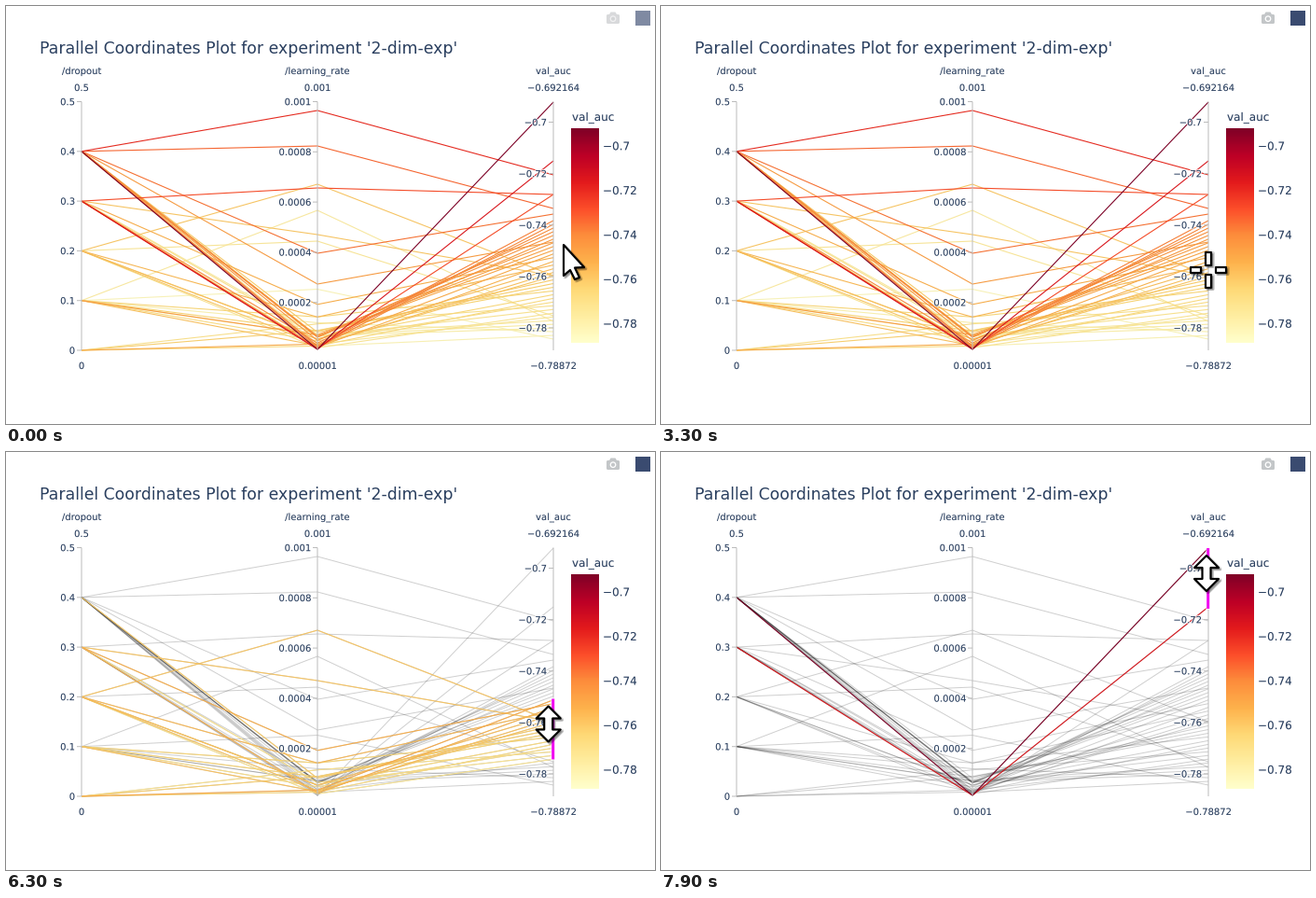
Recreate the animation shown at these times as a matplotlib script. Size 696x448 px, loop 8 s.

```python
import matplotlib.pyplot as plt
import numpy as np
from matplotlib import patheffects
from matplotlib.animation import FuncAnimation
from matplotlib.collections import LineCollection
from matplotlib.patches import Circle, FancyBboxPatch, Polygon, Rectangle

W, H, DPI = 696, 448, 100
STEP, LOOP = 100, 8000
PX = 72 / DPI
INK = "#2a3f5f"
AXES_X = (81, 334, 587)
TOP, BOTTOM = 102.5, 369
CMAP = plt.get_cmap("YlOrRd")

# Trials that stand out: dropout in tenths, height on learning_rate, height on val_auc
KEY_TRIALS = [
    (4, 368, 103), (3, 368, 166), (4, 112, 181), (3, 195, 202), (3, 367, 202),
    (4, 150, 217), (4, 265, 223), (4, 298, 253), (2, 191, 289), (3, 245, 289),
    (2, 252, 332), (1, 219, 338),
]


def usual_trials(count=33):
    """Small learning rates; the worse the score, the wider and the less dropout."""
    rng = np.random.default_rng(4)
    good = np.array([0.32, 0.08, 0.05, 0.23, 0.32])
    poor = np.array([0.30, 0.32, 0.25, 0.09, 0.04])
    for worse in np.linspace(0, 1, count):
        dropout = rng.choice(5, p=good + (poor - good) * worse)
        rate = max(275, 367 - rng.exponential(6 + 20 * worse))
        yield dropout, rate, 230 + 127 * worse


TRIALS = sorted(KEY_TRIALS + list(usual_trials()), key=lambda trial: -trial[2])
SEGMENTS = [list(zip(AXES_X, (BOTTOM - d * 53.3, lr, val))) for d, lr, val in TRIALS]
VALS = np.array([trial[2] for trial in TRIALS])
COLORS = CMAP((BOTTOM - VALS) / (BOTTOM - TOP))
COLORS[:, :3] *= 0.97

fig = plt.figure(figsize=(W / DPI, H / DPI), dpi=DPI, facecolor="white")
ax = fig.add_axes([0, 0, 1, 1])
ax.axis("off")


def label(x, y, text, size=10, ha="center", halo=True):
    item = ax.text(x, y, text, fontsize=size * PX, ha=ha, va="baseline", color=INK,
                   family="DejaVu Sans", zorder=6)
    if halo:
        item.set_path_effects([patheffects.withStroke(linewidth=1.5, foreground="#ffffffb0")])


def rule(xs, ys, color="#bcbcbc", width=1, zorder=4):
    return ax.plot(xs, ys, color=color, lw=width * PX, solid_capstyle="butt",
                   snap=False, zorder=zorder)[0]


def draw_axis(x, name, high, low, ticks):
    rule((x, x), (TOP, BOTTOM))
    label(x, 73, name)
    label(x, 91, high)
    label(x, 389, low)
    for text, y in ticks:
        rule((x - 5, x), (y, y))
        label(x - 7, y + 3.7, text, ha="right")


def draw_static():
    label(36, 51, "Parallel Coordinates Plot for experiment '2-dim-exp'", 17.2, "left", False)
    draw_axis(81, "/dropout", "0.5", "0",
              [(f"{k / 10:g}", BOTTOM - k * 53.3) for k in range(6)])
    draw_axis(334, "/learning_rate", "0.001", "0.00001",
              [(f"{k / 5000:g}", 371.5 - k * 53.8) for k in range(1, 6)])
    marks = [f"{-0.7 - k / 50:.2f}".rstrip("0").replace("-", "−") for k in range(5)]
    draw_axis(587, "val_auc", "−0.692164", "−0.78872",
              [(m, 124.5 + k * 55.1) for k, m in enumerate(marks)])

    ax.imshow(np.linspace(1, 0, 230)[:, None], cmap=CMAP, extent=(606, 636, 361, 131),
              aspect="auto", zorder=5)
    label(607, 123, "val_auc", 12, "left")
    for k, m in enumerate(marks):
        label(640, 154.3 + k * 47.6, m, 12, "left")


def draw_toolbar():
    gray = "#c3c6c8"
    parts = [
        FancyBboxPatch((644, 9), 14, 10, boxstyle="round,pad=0,rounding_size=1.5", fc=gray, lw=0),
        Polygon([(647, 9), (648.5, 6.5), (653.5, 6.5), (655, 9)], fc=gray, lw=0),
        Circle((651, 13.7), 3.4, fc="white", lw=0),
        Circle((651, 13.7), 2.1, fc=gray, lw=0),
        Rectangle((675, 5), 16, 16, fc="#3a4b70", lw=0),
    ]
    for part in parts:
        ax.add_patch(part)
    return parts


draw_static()
toolbar = draw_toolbar()
context = ax.add_collection(LineCollection(SEGMENTS, colors=[(0, 0, 0, 0.19)],
                                           linewidths=PX, zorder=2))
focus = ax.add_collection(LineCollection(SEGMENTS, colors=COLORS,
                                         linewidths=1.1 * PX, zorder=3))
brush_edge = rule((587, 587), (0, 0), "white", 5, 7)
brush = rule((586.7, 586.7), (0, 0), "#f000f0", 3, 8)
ax.set_xlim(0, W)
ax.set_ylim(H, 0)


def box(x, y, w, h):
    return [(x, y), (x + w, y), (x + w, y + h), (x, y + h)]


def mirrored(half):
    return half + [(-x, y) for x, y in reversed(half)]


POINTER = [[(0, 0), (0, 33), (7, 27), (12, 37), (17, 35), (12, 24.5), (22, 24)]]
CROSS = [box(-3, -19, 6, 14), box(-3, 5, 6, 14), box(-19, -3, 11, 6), box(8, -3, 11, 6)]
UP_DOWN = [mirrored([(0, -19), (13, -6), (4.5, -6), (4.5, 6), (13, 6), (0, 19)])]
DOWN = [mirrored([(4, -16), (4, -3), (12, -3), (0, 10)]), box(-15, 11, 30, 6)]
cursor_parts = []


def show_cursor(shapes, x, y):
    while cursor_parts:
        cursor_parts.pop().remove()

    def add(points, shift, **style):
        patch = Polygon(np.array(points) + (x + shift, y + shift), joinstyle="round", **style)
        cursor_parts.append(ax.add_patch(patch))

    for points in shapes:
        for shift, width in ((2, 2), (1.5, 4)):
            add(points, shift, fc="#00000028", ec="#00000028", lw=width * PX, zorder=9)
    for points in shapes:
        add(points, 0, fc="white", ec="black", lw=2.2 * PX, zorder=10)


def progress(t, start, end):
    return min(max((t - start) / (end - start), 0), 1)


def brush_span(t):
    top = 286 - 183 * progress(t, 5900, 7900) ** 1.33
    return top, top + 65 * progress(t, 3900, 4700)


def cursor_at(t):
    if t < 1400:
        return POINTER, 598, 256
    if t < 2900:
        # one sweep round the left of the plot and back
        angle = np.radians(-70 - 290 * progress(t, 1400, 2400))
        return POINTER, 520 + 100 * np.cos(angle), 296 + 48 * np.sin(angle)
    if t < 5100:
        drag = progress(t, 3900, 4700)
        return CROSS, 587 + 26 * drag, 283 + 62 * drag
    if t < 5200:
        return DOWN, 592, 329
    return UP_DOWN, 577 + 8 * progress(t, 5900, 7900) ** 0.33, brush_span(t)[0] + 27


def update(frame):
    t = frame * STEP
    for part in toolbar:
        part.set_alpha(0.65 + 0.35 * progress(t, 0, 200))

    brushing = t >= 4000
    for artist in (context, brush, brush_edge):
        artist.set_visible(brushing)
    keep = np.ones(len(VALS), bool)
    if brushing:
        top, bottom = brush_span(t)
        keep = (VALS >= top) & (VALS <= bottom)
        brush.set_ydata((top, bottom))
        brush_edge.set_ydata((top - 1, bottom + 1))
    focus.set_segments([s for s, k in zip(SEGMENTS, keep) if k])
    focus.set_color(COLORS[keep])
    show_cursor(*cursor_at(t))
    return []


anim = FuncAnimation(fig, update, frames=LOOP // STEP, interval=STEP,
                     repeat=True, repeat_delay=0, blit=False)
plt.show()
```
